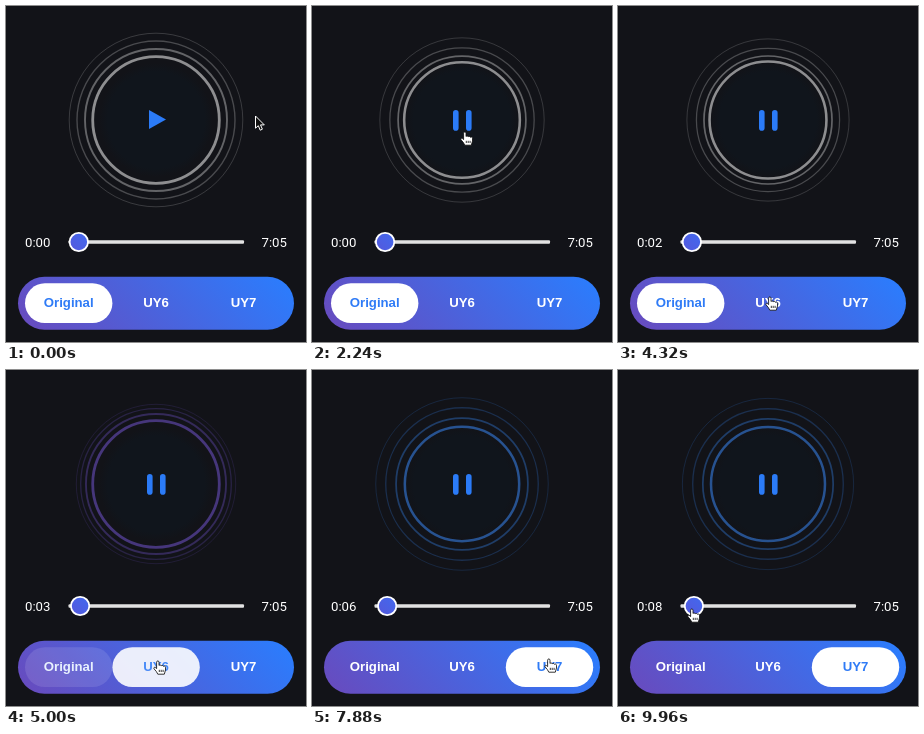
Recreate the animation shown at these times as an HTML page. Size 300 by 336 pixels, loop 10 s.

```html
<!DOCTYPE html>
<html lang="en">
<head>
<meta charset="utf-8">
<title>Audio comparison player</title>
<style>
  html, body { margin: 0; width: 100%; height: 100%; overflow: hidden; background: #121318; }
  svg { display: block; width: 100%; height: 100%; }
  .time { font: 13.2px Roboto, Arial, sans-serif; fill: #fff; }
  .tab { font: bold 13.2px "Liberation Sans", Arial, sans-serif; text-anchor: middle; }
</style>
</head>
<body>
<svg viewBox="0 0 300 336">
  <defs>
    <linearGradient id="bar" gradientUnits="userSpaceOnUse" x1="68" y1="379" x2="232" y2="215">
      <stop offset="0" stop-color="#694abd"/>
      <stop offset="1" stop-color="#297eff"/>
    </linearGradient>
    <linearGradient id="knob" x1="0" y1="1" x2="1" y2="0">
      <stop offset="0" stop-color="#5558dc"/>
      <stop offset="1" stop-color="#4169ee"/>
    </linearGradient>
    <radialGradient id="disc">
      <stop offset=".85" stop-color="#10151c"/>
      <stop offset="1" stop-color="#121318"/>
    </radialGradient>
  </defs>

  <circle cx="150" cy="114" r="57" fill="url(#disc)"/>
  <g id="rings" fill="none"></g>
  <path id="icon" fill="#2b7bf7"/>

  <text class="time" id="now" x="19" y="241">0:00</text>
  <text class="time" x="255.5" y="241">7:05</text>
  <rect x="62.5" y="234.2" width="175.5" height="3.6" rx="1" fill="#e2e2e2"/>
  <circle id="thumb" cy="236" r="9.2" fill="url(#knob)" stroke="#fff" stroke-width="1.8"/>

  <rect x="12" y="270.7" width="276" height="53" rx="26.5" fill="url(#bar)"/>
  <g id="tabs"></g>

  <g id="cursor" stroke-linejoin="round">
    <path id="arrow" d="M.5 0V12.2L3.3 9.7L5.2 14.2L7.4 13.2L5.5 8.9H9.3Z" fill="#111" stroke="#fff"/>
    <path id="hand" d="M-1.4 1.2C-1.4-.5 1-.5 1 1.2V4.5C1.4 3.7 3 3.8 3.2 4.8C3.8 4.1 5.2 4.3 5.4 5.3C6.2 4.7 7.5 5.2 7.5 6.3V9L6.3 13.2H-.2L-1.6 10.6L-4 7.8C-4.6 6.7-3.4 5.8-2.5 6.6L-1.4 7.6Z M1.3 8.8V11M3.2 8.8V11M5.1 8.8V11" fill="#fff" stroke="#111" stroke-width=".85"/>
  </g>
</svg>

<script>
const LOOP = 10000, CLICK = 1000, AUDIO = 1400, SECOND_TAB = 4800, THIRD_TAB = 7300;
const PLAY = 'M143 104L160 113.5L143 123Z';
const bar = x => `M${x} 106.7a2.8 2.8 0 0 1 5.6 0v15.2a2.8 2.8 0 0 1-5.6 0Z`;
const PAUSE = bar(141) + bar(154);
const WHITE = [255, 255, 255], BLUE = [47, 123, 246];

const $ = id => document.getElementById(id);
const set = (node, attrs) => {
  for (const key in attrs) node.setAttribute(key, attrs[key]);
  return node;
};
const add = (parent, tag, attrs) =>
  $(parent).appendChild(set(document.createElementNS('http://www.w3.org/2000/svg', tag), attrs));
const clamp = v => Math.max(0, Math.min(1, v));
const mix = (a, b, p) => a + (b - a) * p;

// radius, line width, opacity
const rings = [[63.3, 2.8, .52], [71, 1.9, .34], [79, 1.4, .23], [86.8, 1, .17]].map(([r, w, o]) =>
  add('rings', 'circle', { r, 'stroke-width': w, 'stroke-opacity': o }));

const tabs = ['Original', 'UY6', 'UY7'].map((name, i) => {
  const x = 19 + i * 87.4;
  const pill = add('tabs', 'rect', { x, y: 277.3, width: 87.4, height: 39.8, rx: 19.9, fill: '#fff' });
  const label = add('tabs', 'text', { class: 'tab', x: x + 43.7, y: 301.4 });
  label.textContent = name;
  return { pill, label };
});

// start, end, target x, target y, bend of the path
const moves = [
  [100, 760, 153, 126, 1],
  [3200, 3920, 152, 291, 1],
  [6500, 7020, 237, 289, 1],
  [8600, 9280, 74, 239, 2]
];

function cursorAt(t) {
  let x = 249, y = 110;
  for (const [from, to, tx, ty, bend] of moves) {
    const p = clamp((t - from) / (to - from)), e = p * p * (3 - 2 * p);
    x = mix(x, tx, e);
    y = mix(y, ty, e ** bend);
  }
  return [x, y];
}

const isClickable = (x, y) =>
  Math.hypot(x - 150, y - 114) < 55 ||
  (x > 62 && x < 238 && y > 226 && y < 246) ||
  (x > 19 && x < 281 && y > 277 && y < 317 && Math.abs(x - 194) > 2);

const fade = (t, start) => 1 - (1 - clamp((t - start) / 300)) ** 2;

function draw(t) {
  set($('rings'), { stroke: t < SECOND_TAB ? '#fff' : t < THIRD_TAB ? '#7657d6' : '#3a8cff' });
  rings.forEach((ring, i) => {
    const run = Math.max(0, t - CLICK - i * 240);
    const scale = .95 + .05 * Math.cos(run * Math.PI / 1000);
    set(ring, { transform: `translate(150 114) scale(${scale})` });
  });
  set($('icon'), { d: t < CLICK ? PLAY : PAUSE });

  const seconds = Math.max(0, t - AUDIO) / 1000;
  $('now').textContent = '0:0' + Math.floor(seconds);
  set($('thumb'), { cx: 72.8 + seconds * 155 / 425 });

  const second = fade(t, SECOND_TAB), third = fade(t, THIRD_TAB);
  [1 - second, second - third, third].forEach((on, i) => {
    set(tabs[i].pill, { opacity: on });
    set(tabs[i].label, { fill: `rgb(${WHITE.map((c, k) => Math.round(mix(c, BLUE[k], on)))})` });
  });

  const [x, y] = cursorAt(t), hand = isClickable(x, y);
  set($('cursor'), { transform: `translate(${x} ${y})` });
  set($('hand'), { visibility: hand ? 'visible' : 'hidden' });
  set($('arrow'), { visibility: hand ? 'hidden' : 'visible' });
}

const start = performance.now();
function tick() {
  draw((performance.now() - start) % LOOP);
  requestAnimationFrame(tick);
}
tick();
</script>
</body>
</html>
```
